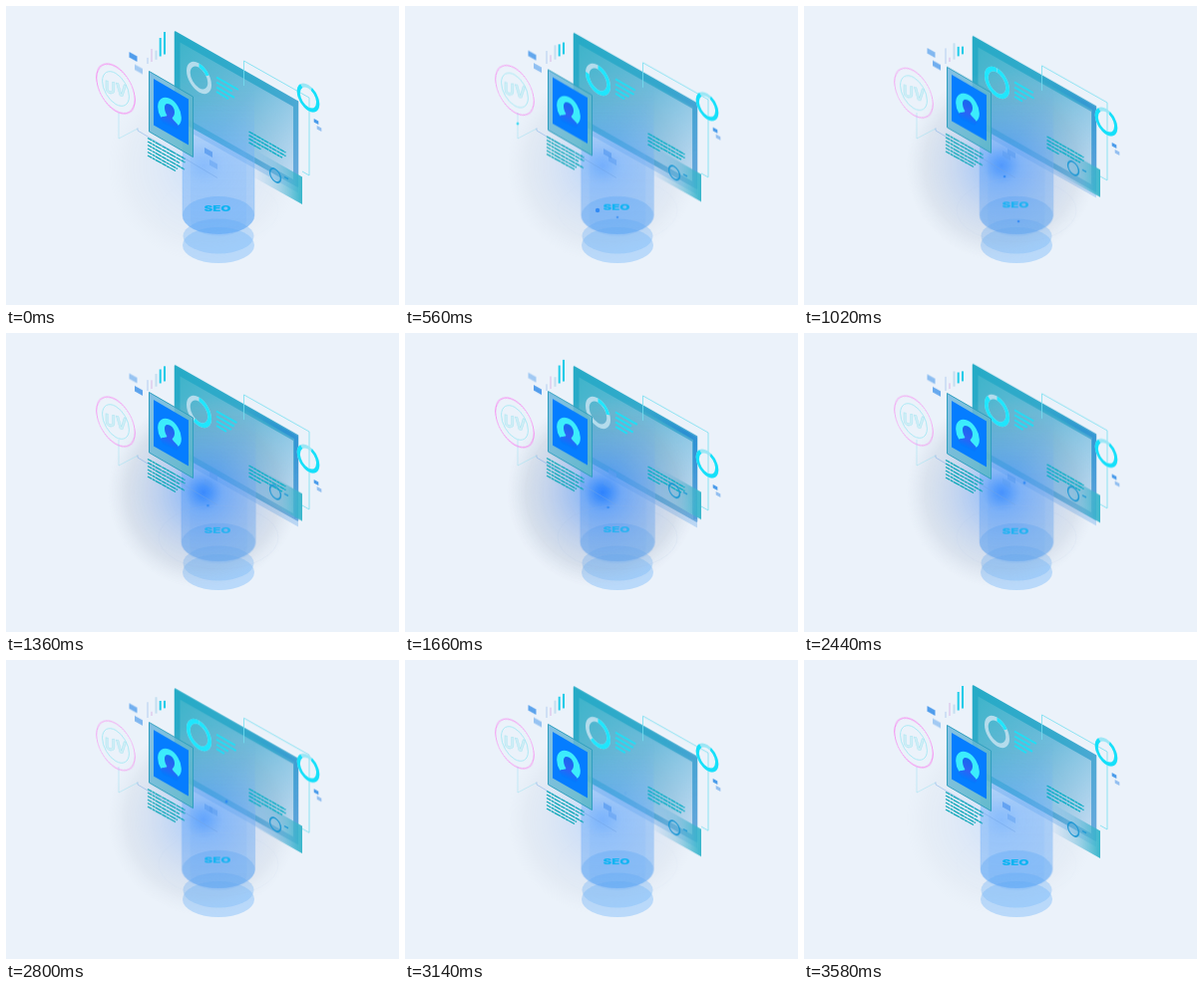
An HTML page that plays this animation: 394 px wide and 300 px high, repeating every 3600 ms.

```html
<!DOCTYPE html>
<html lang="en">
<head>
<meta charset="utf-8">
<title>Isometric dashboard</title>
<style>
html, body { margin: 0; width: 100%; height: 100%; overflow: hidden; background: #ebf2fa; }
svg { display: block; width: 394px; height: 300px; }

/* slow parts swing once per loop, quick parts twice */
.float, .fade, .breathe { animation: 1.8s cubic-bezier(.37, 0, .63, 1) infinite alternate; }
.float { animation-name: float; }
.fade { animation-name: fade; }
.breathe { animation-name: breathe; transform-origin: 213px 210px; }
.bar, .ring, .row, .pulse { animation: .9s cubic-bezier(.37, 0, .63, 1) infinite alternate; }
.bar { animation-name: grow; transform-box: fill-box; transform-origin: 50% 100%; }
.ring { animation-name: fill; stroke-dasharray: 100 100; }
.row { animation-name: draw; stroke-dasharray: 100 100; }
.pulse { animation-name: fade; }
@keyframes float { to { transform: translateY(var(--d)); } }
@keyframes fade { from { opacity: var(--a); } to { opacity: var(--b); } }
@keyframes breathe { to { transform: scale(1.035, 1.01); } }
@keyframes grow { from { transform: scaleY(var(--a)); } to { transform: scaleY(var(--b)); } }
@keyframes fill { from { stroke-dashoffset: 85; } to { stroke-dashoffset: -3; } }
@keyframes draw { from { stroke-dashoffset: var(--a); } to { stroke-dashoffset: var(--b); } }

.spark { animation: 3.6s linear infinite; opacity: 0; fill: #2a86f5; }
.s1 { animation-name: s1; }
.s2 { animation-name: s2; }
.s3 { animation-name: s3; }
.s4 { animation-name: s4; }
.s5 { animation-name: s5; fill: #4fdcf2; }
@keyframes s1 {
  0%, 8% { opacity: 0; transform: translate(193px, 207px); }
  15.5% { opacity: .9; transform: translate(193px, 205px); }
  24%, 100% { opacity: 0; transform: translate(195px, 202px); }
}
@keyframes s2 {
  0%, 9% { opacity: 0; transform: translate(212px, 210px); }
  16% { opacity: .6; transform: translate(213px, 212px); }
  28% { opacity: .8; transform: translate(215px, 216px); }
  36%, 100% { opacity: 0; transform: translate(216px, 218px); }
}
@keyframes s3 {
  0%, 22% { opacity: 0; transform: translate(200px, 169px); }
  28% { opacity: .8; transform: translate(201px, 171px); }
  56% { opacity: .7; transform: translate(205px, 177px); }
  66%, 100% { opacity: 0; transform: translate(206px, 179px); }
}
@keyframes s4 {
  0%, 46% { opacity: 0; transform: translate(221px, 168px); }
  56% { opacity: .8; transform: translate(221px, 160px); }
  78% { opacity: .8; transform: translate(221px, 142px); }
  88%, 100% { opacity: 0; transform: translate(221px, 133px); }
}
@keyframes s5 {
  0%, 6% { opacity: 0; transform: translate(113px, 109px); }
  15.5% { opacity: 1; transform: translate(113px, 118px); }
  24% { opacity: 0; transform: translate(113px, 127px); }
  46% { opacity: 0; transform: translate(124px, 134px); }
  56% { opacity: .9; transform: translate(129px, 131px); }
  66%, 100% { opacity: 0; transform: translate(135px, 128px); }
}
</style>
</head>
<body>
<svg viewBox="0 0 394 300" fill="none">
  <defs>
    <linearGradient id="frame" x1="0" y1="0" x2="1" y2="1">
      <stop offset="0" stop-color="#25abc6"/>
      <stop offset=".55" stop-color="#38a9cd"/>
      <stop offset="1" stop-color="#6ba8de"/>
    </linearGradient>
    <linearGradient id="glass" x1="0" y1="0" x2="1" y2="1">
      <stop offset="0" stop-color="#3fb4ca"/>
      <stop offset=".5" stop-color="#70bcdc"/>
      <stop offset="1" stop-color="#c4dcf3"/>
    </linearGradient>
    <linearGradient id="edge" gradientUnits="userSpaceOnUse" x1="235" y1="65" x2="293" y2="180">
      <stop offset="0" stop-color="#2389d2" stop-opacity="0"/>
      <stop offset=".35" stop-color="#2389d2"/>
      <stop offset="1" stop-color="#3f92dc" stop-opacity=".5"/>
    </linearGradient>
    <linearGradient id="tab" gradientUnits="userSpaceOnUse" x1="246" y1="0" x2="297" y2="0">
      <stop offset="0" stop-color="#7bb9e8" stop-opacity="0"/>
      <stop offset=".5" stop-color="#62b9dc" stop-opacity=".45"/>
      <stop offset="1" stop-color="#2fb3c8" stop-opacity=".95"/>
    </linearGradient>
    <linearGradient id="beam" gradientUnits="userSpaceOnUse" x1="0" y1="84" x2="0" y2="229">
      <stop offset="0" stop-color="#68b4f8" stop-opacity="0"/>
      <stop offset=".45" stop-color="#70b2fb" stop-opacity=".46"/>
      <stop offset="1" stop-color="#6aaffb" stop-opacity=".5"/>
    </linearGradient>
    <radialGradient id="glow">
      <stop offset="0" stop-color="#0a6cff" stop-opacity=".85"/>
      <stop offset=".07" stop-color="#1675fc" stop-opacity=".78"/>
      <stop offset=".2" stop-color="#3f87f2" stop-opacity=".58"/>
      <stop offset=".5" stop-color="#6f96d8" stop-opacity=".42"/>
      <stop offset=".8" stop-color="#97a5bd" stop-opacity=".27"/>
      <stop offset="1" stop-color="#b4bfd0" stop-opacity="0"/>
    </radialGradient>
    <linearGradient id="card" x1="0" y1="0" x2="1" y2="1">
      <stop offset="0" stop-color="#72b8e0"/>
      <stop offset="1" stop-color="#59b7c4"/>
    </linearGradient>
    <linearGradient id="person" x1="0" y1="0" x2="0" y2="1">
      <stop offset="0" stop-color="#1468ee"/>
      <stop offset=".55" stop-color="#2f62f4"/>
      <stop offset="1" stop-color="#007cff"/>
    </linearGradient>
    <path id="tile" d="M-4-5 4-.5V5L-4 .5Z"/>
    <path id="chip" d="M-2.3-3 2.3-.4V3L-2.3.4Z"/>
  </defs>

  <!-- screen -->
  <g class="float" style="--d:8px" stroke-linejoin="round">
    <path fill="#b9d6f4" d="M169 118 293 187.500V180L169 112Z"/>
    <path fill="url(#frame)" stroke="url(#frame)" stroke-width="1.500" d="M169.500 26 292.500 96V181L169.500 112Z"/>
    <path fill="url(#glass)" d="M174.500 36.500 288 101V174L174.500 109Z"/>
    <path class="fade" style="--a:0;--b:.8" stroke="url(#edge)" stroke-width="4" d="M236 66 291 98V179"/>
  </g>

  <!-- lower tab -->
  <g class="float" style="--d:-12px">
    <path fill="url(#tab)" d="M246 142.500 297 171.500V199L246 170.500Z"/>
  </g>

  <!-- pedestal and beam -->
  <ellipse cx="213" cy="240" rx="36" ry="18" fill="#83bffb" fill-opacity=".48"/>
  <ellipse cx="213" cy="231" rx="35.500" ry="17.500" fill="#78b8fb" fill-opacity=".4"/>
  <g class="breathe">
    <path fill="url(#beam)" d="M177 84V210A36 19 0 0 0 249 210V84Z"/>
    <path fill="url(#beam)" fill-opacity=".3" d="M185 100V216A28 15 0 0 0 241 216V100Z"/>
    <ellipse cx="213" cy="210" rx="36" ry="19" fill="#3f9bf8" fill-opacity=".27"/>
    <path stroke="#7fb8fa" stroke-opacity=".6" stroke-width=".6" d="M177 150V210A36 19 0 0 0 249 210V150"/>
  </g>

  <!-- glow -->
  <g class="fade" style="--a:.22;--b:.92">
    <circle cx="198" cy="160" r="96" fill="url(#glow)"/>
    <ellipse cx="213" cy="205" rx="60" ry="32" stroke="#9bb4da" stroke-opacity=".2" stroke-width=".6"/>
  </g>

  <!-- screen contents -->
  <g class="float" style="--d:8px">
    <g transform="matrix(.866 .5 0 1 193.500 72)" stroke-width="4.300">
      <circle r="12.300" stroke="#b4dcec"/>
      <circle class="ring" r="12.300" pathLength="100" stroke="#1fe6fd" transform="rotate(-90)"/>
    </g>
    <g stroke="#1fdff6" stroke-width="1.800">
      <path class="row" pathLength="100" style="--a:0;--b:15" d="M211 71.500 233 84"/>
      <path class="row" pathLength="100" style="--a:25;--b:6" d="M211 76.500 232 88.500"/>
      <path class="row" pathLength="100" style="--a:10;--b:42" d="M211 81.500 231 93"/>
      <path class="row" pathLength="100" style="--a:20;--b:48" d="M211 86 226 95"/>
    </g>
    <path stroke="#74dff0" stroke-width=".8" d="M238.500 80V55L304 92V170L297 166"/>
    <path stroke="#10afc6" stroke-width="1.400" stroke-dasharray="5 .5 3 .4"
      d="M243.500 126 280.500 147M243.500 129.600 280.500 150.600M243.500 133.200 277 152.200M243.500 136.800 256 144"/>
  </g>
  <g class="float" style="--d:-12px" stroke="#2199d4">
    <circle r="6.300" stroke-width="1.600" transform="matrix(.866 .5 0 1 270 170)"/>
    <path stroke-width="1.400" d="M279 171.500 283 173.700"/>
  </g>

  <g class="float" style="--d:-6px">
    <g class="fade" style="--a:1;--b:.7">
      <text transform="translate(212 206) scale(1.2 .72)" text-anchor="middle" fill="#0cb4f2"
        font-family="Inter, Arial, sans-serif" font-weight="900" font-size="11">SEO</text>
    </g>
  </g>

  <!-- connector -->
  <path stroke="#8fdff0" stroke-opacity=".6" stroke-width=".7" d="M113 107V133L132 123"/>
  <path stroke="#72a5e6" stroke-opacity=".6" stroke-width=".8" d="M132 122.500V125L212 172.500"/>

  <!-- tiles over the beam -->
  <g fill="#5c9df0">
    <g class="float" style="--d:5px"><use class="fade" style="--a:.85;--b:.3" href="#tile" x="203" y="147"/></g>
    <g class="float" style="--d:-18px"><use class="fade" style="--a:.45;--b:.75" href="#tile" x="208" y="159"/></g>
  </g>

  <!-- profile card -->
  <g class="float" style="--d:-7px">
    <path fill="url(#card)" fill-opacity=".85" stroke="#2f9fbe" stroke-width="1" stroke-linejoin="round"
      d="M143.500 65.500 187.500 91V151.500L143.500 126Z"/>
    <path fill="#057dff" d="M148 73 183 93.500V139.500L148 119.500Z"/>
    <g transform="matrix(.866 .4 0 1 164 106.500)">
      <circle r="13.700" fill="#3cecfc"/>
      <path fill="url(#person)" d="M0-8C4-8 6-5 5.800-2 5.700 1 4.200 3 3 4.500 4 7 9 7 11 10.500L8 14.500H-8L-11 10.500C-9 7-4 7-3 4.500-4.200 3-5.700 1-5.800-2-6-5-4-8 0-8Z"/>
    </g>
    <path stroke="#14a9ba" stroke-width="1.350" stroke-dasharray="5 .5 3 .4 7 .5"
      d="M142 132.500 179.500 153.500M142 136 179.500 157M142 139.500 174 157.500M142 143 179 164M142 146.500 172 163.500M142 150 170 165.500"/>
  </g>

  <!-- badge -->
  <g class="float" style="--d:7px">
    <g transform="matrix(.866 .5 0 1 110 83)">
      <circle class="pulse" style="--a:1;--b:.7" r="22.300" stroke="#fb62ee" stroke-width=".8"/>
      <circle r="15.500" stroke="#9fe8f3" stroke-width=".8"/>
    </g>
    <text transform="matrix(.9 .2 0 1 110 83)" y="6" text-anchor="middle" fill="#cfeef6" stroke="#a4e3f0" stroke-width=".5"
      font-family="Inter, Arial, sans-serif" font-weight="700" font-size="16.500">UV</text>
  </g>

  <!-- bars -->
  <path class="bar" style="--a:.38;--b:1" fill="#cfe0f5" d="M141 42H143V58H141Z"/>
  <path class="bar" style="--a:1;--b:.3" fill="#e2d5f0" d="M145 43H147V56H145Z"/>
  <path class="bar" style="--a:.55;--b:1" fill="#c3dff0" d="M149.500 37H151.500V54H149.500Z"/>
  <path class="bar" style="--a:1;--b:.5" fill="#1fcdea" d="M153.700 32H155.700V50.500H153.700Z"/>
  <path class="bar" style="--a:1;--b:.32" fill="#16cbe8" d="M158 26H160V48.500H158Z"/>

  <!-- tiles at the left -->
  <g class="float" style="--d:-6.500px" fill="#3f93ea">
    <use class="fade" style="--a:.9;--b:.42" href="#tile" x="127.500" y="51"/>
    <use class="fade" style="--a:.42;--b:.9" href="#tile" x="133" y="63.500"/>
  </g>

  <!-- ring and chips at the right -->
  <g class="float" style="--d:39.500px">
    <g transform="matrix(.866 .5 0 1 303 92)" stroke-width="3.600">
      <circle r="11.200" stroke="#9be6f5"/>
      <circle r="11.200" pathLength="100" stroke="#15e0fa" stroke-dasharray="82 18" transform="rotate(-70)"/>
    </g>
    <use href="#chip" x="311" y="116" fill="#4a9bea"/>
    <use href="#chip" x="314" y="123" fill="#93bff0"/>
  </g>

  <circle class="spark s1" r="2.200"/>
  <circle class="spark s2" r="1.300"/>
  <circle class="spark s3" r="1.300"/>
  <circle class="spark s4" r="1.400"/>
  <circle class="spark s5" r="1.400"/>
</svg>
</body>
</html>
```
